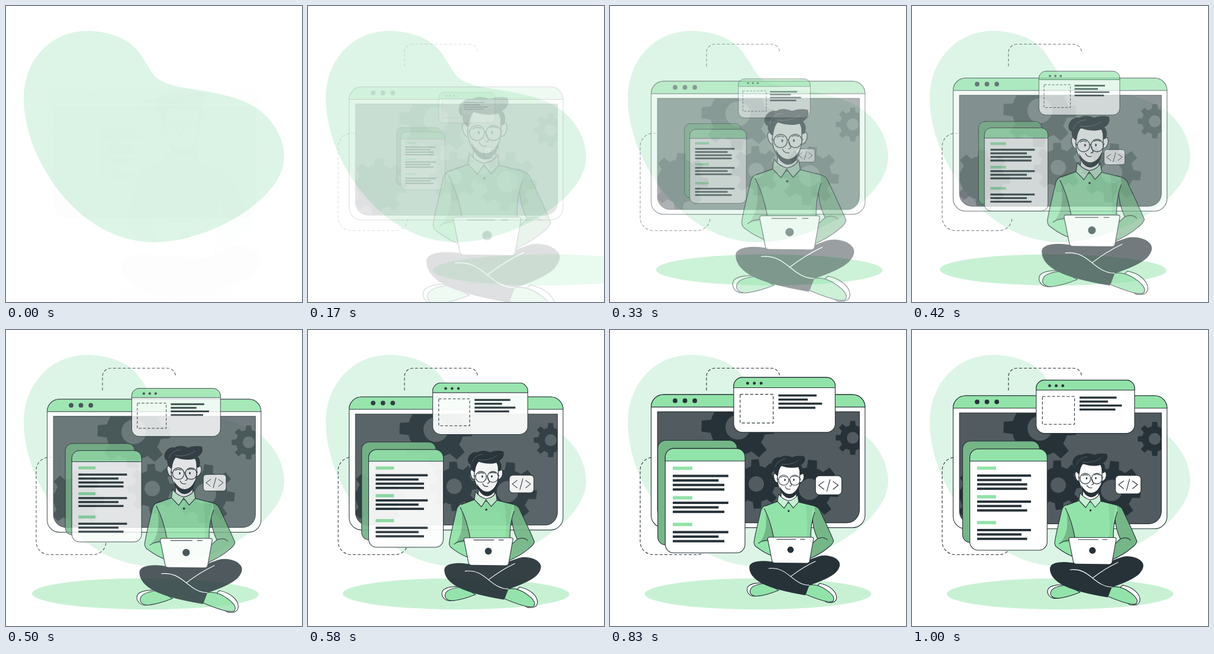
An HTML page for the animation above (1.04 s loop, 500x500 px).

```html
<!DOCTYPE html>
<html lang="en">
<head>
<meta charset="utf-8">
<title>Developer at work</title>
<style>
html, body { margin: 0; width: 100%; height: 100%; overflow: hidden; background: #fff; }
svg { display: block; width: 100vw; height: 100vh; }
.line { stroke: #263238; stroke-width: 1.1; stroke-linejoin: round; stroke-linecap: round; }
.bare { fill: none; }
.dash { fill: none; stroke: #263238; stroke-width: 1.1; stroke-dasharray: 5 3.2; }
.dark { fill: #263238; }
.green { fill: #92e3a9; }
.shade { fill: #75b687; }
.pale { fill: #c8f1d4; }
.white { fill: #fff; }
.slate { fill: #515b60; }
.thin { fill: none; stroke: #fff; stroke-width: 1.1; stroke-linecap: round; }
</style>
</head>
<body>
<svg viewBox="0 0 500 500">
  <path fill="#ddf5e6" d="M30 157C30 90 76 42 138 42C165 42 193 51 208 62C232 80 240 108 254 121C284 145 350 137 408 164C446 181 470 220 470 255C470 325 345 399 250 399C120 399 30 255 30 157Z"/>
  <ellipse id="floor" class="pale" rx="191.5" ry="26.3"/>

  <g id="guides" class="dash">
    <path d="M163 102V78.5A14 14 0 0 1 177 64.5H272.5A14 14 0 0 1 286.5 78.5"/>
    <path d="M78 215H73A22 22 0 0 0 51 237V357.5A22 22 0 0 0 73 379.5H147A22 22 0 0 0 169 357.5"/>
  </g>

  <g id="browser">
    <clipPath id="screenClip"><path id="screenShape" d="M80.2 140H421.3V306A21.5 21.5 0 0 1 399.8 327.5H101.7A21.5 21.5 0 0 1 80.2 306Z"/></clipPath>
    <rect class="white line" x="69.5" y="111" width="361.3" height="224.8" rx="21"/>
    <path class="green line" d="M69.5 132A21 21 0 0 1 90.5 111H409.8A21 21 0 0 1 430.8 132Z"/>
    <g class="dark"><circle cx="110" cy="121.3" r="3.9"/><circle cx="126.6" cy="121.3" r="3.9"/><circle cx="143.2" cy="121.3" r="3.9"/></g>
    <use href="#screenShape" class="slate"/>
    <g id="gears" class="dark" clip-path="url(#screenClip)"></g>
    <use href="#screenShape" class="bare line"/>
  </g>

  <g id="panels">
    <rect class="shade line" x="85.5" y="187.8" width="130" height="171.2" rx="13"/>
    <rect class="white line" x="97.7" y="201" width="130.6" height="171" rx="14"/>
    <path class="green line" d="M97.7 221.5V215A14 14 0 0 1 111.7 201H214.3A14 14 0 0 1 228.3 215V221.5Z"/>
    <rect class="white line" x="209.8" y="84.6" width="166.2" height="90" rx="14"/>
    <path class="green line" d="M209.8 101.5V98.6A14 14 0 0 1 223.8 84.6H362A14 14 0 0 1 376 98.6V101.5Z"/>
    <g class="dark"><circle cx="232.5" cy="94.2" r="2.4"/><circle cx="243.6" cy="94.2" r="2.4"/><circle cx="254.7" cy="94.2" r="2.4"/></g>
    <rect class="dash" x="220.3" y="112.3" width="54.2" height="47"/>
    <g id="bars"></g>
    <rect class="white line" x="343.7" y="245.7" width="43" height="31" rx="6"/>
    <path class="bare line" d="M357.5 255L349 261.2L357.5 268M367.5 252L362.3 271M372.5 255L381 261.2L372.5 268"/>
  </g>

  <g id="person">
    <path class="white line" d="M262 431C250 429 236 431 231 436C226 443 231 453 242 453.5C256 453 268 449 280 444Z"/>
    <path class="green line" d="M262 431C250 432 238 435 235 441C232 448 237 454 248 453C262 451.5 274 447 284 443Z"/>
    <path class="white line" d="M356 431C372 434 386 445 385 457C384 464 377 465.5 368 464L340 445Z"/>
    <path class="green line" d="M337 434C350 432 360 437 368 443C378 450 383 457 379 462C374 466 355 460 331 450Z"/>
    <path class="dark line" d="M274 394C256 391 235 392 233.5 402C233 413 241 423 256 431C272 439 294 445 330 451L337 434C352 429 374 421 384 411C390 404 393 397 387 391C381 384 365 381 355 384L335 391Z"/>
    <path class="thin" d="M267 405C284 403 294 410 305 419C316 428 325 434 337 434M348 392.5C334 399 322 406 305 419"/>

    <path class="shade line" d="M340 294Q352 297 355 302C363 319 374 342 380 357Q378 363 371 368C362 376 352 382 336 389L342 362L352 353C346 341 343 327 343 313Z"/>
    <path class="bare line" d="M352 353C359 350 365 351 369 355"/>
    <path class="green line" d="M283 288L262 295Q255 297 253 304C249 323 243 344 241 359Q241 365 246 368C254 374 263 380 276 384L278 356Q272 335 268 316Z"/>
    <path class="shade" d="M261 308L269 322L275 351L266 358L252 358C262 346 264 326 261 308Z"/>
    <path class="bare line" d="M267 355Q255 356 249 361"/>
    <path class="green" d="M283 288L261 296L260 304C268 320 273 336 277 355H341C340 338 342 320 347 307L346 296L318 289Z"/>
    <path fill="#88d59f" d="M331 293L345 297Q342 306 341 316V350H333C335 332 334 313 331 293Z"/>
    <path class="bare line" d="M283 288L261 296M318 289L346 296M259 301C267 316 272 333 275 351M347 307C342 319 340 335 340 351"/>
    <path class="white line" d="M289 268H315V284L301 291L288 283Z"/>
    <path class="pale line" d="M284 275L282 288L293.5 300L301 288.5L309.5 299.5L319 289L317 276C314 283 307 286 301 287C294 285 288 281 284 275Z"/>
    <circle class="dark" cx="301.5" cy="304.7" r="1.7"/>

    <path class="white line" d="M282 240C277 237 274 241 276 247C277 253 280 256 283 255ZM321 240C326 237 329 240 328 247C327 253 323 256 320 255Z"/>
    <path class="white line" d="M282 226V252C283 264 291 279 302 279C312 279 320 266 321 252V226Z"/>
    <path class="dark" d="M286 262C292 272 297 275 303 275C309 275 315 270 318.5 261C319 272 312 282.5 302 282.5C294 281.5 288 274 286 262Z"/>
    <path class="dark" d="M281 243C277 240 275 235 276 231C270 229 270 221 274 216C278 211 283 210 287 211C293 207 301 208 308 211C315 208 323 208 329 209.5C332 216 328 222 322.5 225C327 229 327 235 325 241L321.5 242C321 236 320 231 318 228C308 231 296 229 289 226C285 231 284 236 283 243Z"/>
    <path class="bare" stroke="#6b7479" stroke-width=".7" d="M278 228C281 219 287 215 296 214M288 223C298 225 312 222 319 216"/>
    <circle class="bare line" cx="292.8" cy="251" r="8.9"/>
    <circle class="bare line" cx="312.3" cy="251" r="8.9"/>
    <path class="bare line" d="M301.6 250Q302.5 249 303.5 250M283.8 250L281 248.5M321.2 250L322.5 248.5M304 252L306.5 259.5Q306 261.5 303.5 261.5M295.5 262Q298 268 304 266.5"/>
    <path class="bare line" d="M288 246Q292 243 297 245.5M308 245Q312 242.5 316.5 245"/>
    <ellipse class="dark" cx="295" cy="250.5" rx="1.2" ry="2"/>
    <ellipse class="dark" cx="310.5" cy="250.3" rx="1.2" ry="2"/>

    <path class="white line" d="M268 350.5H341.5Q345.5 350.5 344.8 354L338 392.2Q337 396.2 332.5 396L277.5 395.4Q273.5 395.3 272.6 392L265 354Q264.6 350.5 268 350.5Z"/>
    <path class="bare line" d="M281 354H314M322 354H329.5"/>
    <circle class="dark" cx="304.8" cy="372.4" r="5.6"/>
  </g>
</svg>
<script>
const LOOP = 1040, LEAD = 33, FPS = 24;
const part = id => document.getElementById(id);

// Ring with tapered teeth and a round hole.
function gear(cx, cy, outer, body, hole, turn = 0, teeth = 8) {
  const at = (r, a) => `${(cx + r * Math.cos(a)).toFixed(1)} ${(cy + r * Math.sin(a)).toFixed(1)}`;
  const step = 2 * Math.PI / teeth, foot = step * .3, tip = step * .19;
  let d = '';
  for (let i = 0; i < teeth; i++) {
    const a = i * step + turn;
    d += i ? `A${body} ${body} 0 0 1 ` : 'M';
    d += `${at(body, a - foot)}L${at(outer, a - tip)}L${at(outer, a + tip)}L${at(body, a + foot)}`;
  }
  d += `A${body} ${body} 0 0 1 ${at(body, turn - foot)}Z`;
  if (hole) d += `M${cx - hole} ${cy}a${hole} ${hole} 0 1 0 ${2 * hole} 0a${hole} ${hole} 0 1 0 ${-2 * hole} 0Z`;
  return `<path fill-rule="evenodd" d="${d}"/>`;
}
part('gears').innerHTML =
  gear(216, 166, 62, 47, 21, .03) + gear(247, 262, 42, 31, 13, -.05) +
  gear(337, 271, 50, 37, 18, .11) + gear(410, 184, 29, 21.5, 10) +
  gear(118, 280, 48, 37, 0, .05);

const bar = (x, y, w, h, kind) => `<rect class="${kind}" x="${x}" y="${y}" width="${w}" height="${h}"/>`;
const block = (tag, first, widths) => bar(110, tag, 32, 5.5, 'green') +
  widths.map((w, i) => bar(110, first + 7.4 * i, w, 3.9, 'dark')).join('');
part('bars').innerHTML =
  block(230.6, 244, [91, 75, 84.5, 84.5]) +
  block(279, 288, [91, 75, 84.5]) +
  block(322.6, 336, [91, 75, 84.5]) +
  [62.5, 48, 71.5, 60.5].map((w, i) => bar(283, 112.5 + 6.7 * i, w, 3.4, 'dark')).join('');

const mix = (a, b, p) => a + (b - a) * p;
const clamp = v => Math.max(0, Math.min(1, v));
const cubic = (s, a, b) => 3 * (1 - s) ** 2 * s * a + 3 * (1 - s) * s * s * b + s ** 3;

// cubic-bezier(.36, -.01, .5, 1.38), solved by bisection
function ease(x) {
  if (x <= 0 || x >= 1) return clamp(x);
  let lo = 0, hi = 1;
  for (let i = 0; i < 30; i++) {
    const mid = (lo + hi) / 2;
    if (cubic(mid, .36, .5) < x) lo = mid; else hi = mid;
  }
  return cubic(lo, -.01, 1.38);
}

function pose(id, transform, opacity) {
  part(id).setAttribute('transform', transform);
  part(id).setAttribute('opacity', clamp(opacity));
}
const zoom = (x, y, s) => `translate(${x} ${y}) scale(${s}) translate(${-x} ${-y})`;

function draw(ms) {
  const tick = Math.floor((ms % LOOP + 4) * FPS / 1000);
  const t = clamp(((tick < 2 ? 0 : tick) * 1000 / FPS + LEAD) / 1000);
  const p = ease(t), dash = ease(t / .6);
  const skew = t < .6 ? mix(-20, 10, dash)
    : t < .8 ? mix(10, -2, ease((t - .6) / .2))
    : mix(-2, 0, ease((t - .8) / .2));
  pose('floor', `translate(${mix(500, 250, dash)} 445.8) skewX(${skew})`, dash);
  pose('guides', '', p);
  pose('browser', `translate(0 ${mix(30, 0, p)})`, p);
  pose('panels', zoom(235.7, 228.3, mix(.5, 1, p)), p);
  pose('person', zoom(310, 336.5, mix(1.5, 1, p)), p);
}

const start = performance.now();
function loop() {
  draw(performance.now() - start);
  requestAnimationFrame(loop);
}
loop();
</script>
</body>
</html>
```
